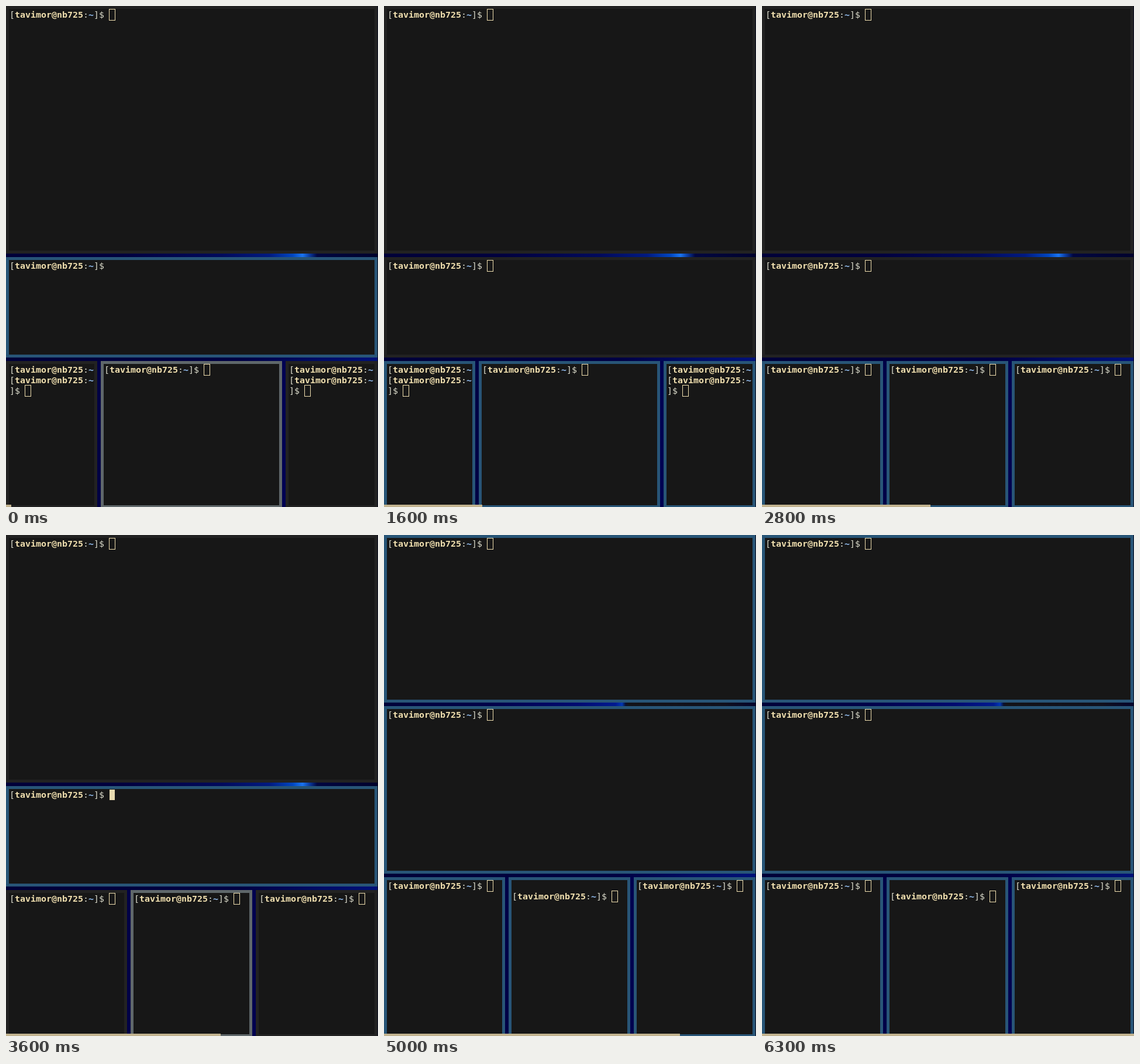
These frames come from a looping animation (636x858 px, 6400 ms). An HTML page:

```html
<!DOCTYPE html>
<html lang="en">
<head>
<meta charset="utf-8">
<title>Tiling windows</title>
<style>
  html, body { margin: 0; width: 100%; height: 100%; overflow: hidden; background: #00003c; }
  #stage { position: absolute; left: 0; top: 0; width: 636px; height: 858px; overflow: hidden;
    background: linear-gradient(90deg, #000038, #000046 30%, #000050 70%, #00065c); }
  .gap { position: absolute; left: 0; width: 636px; height: 6px; }
  #glow { background: linear-gradient(90deg, #000038 0, #00003e 200px, #000a5c 370px, #001a80 450px,
    #0046c0 490px, #1a74f0 507px, #0a3aa0 519px, #000640 532px, #00022c 636px); }
  #glow.high { background: linear-gradient(90deg, #000038 0, #000048 180px, #000a70 330px, #001a90 396px,
    #0038b4 407px, #0a1030 413px, #131318 418px, #10101c 580px, #04042c 636px); }
  #low { background: linear-gradient(90deg, #000038 0, #000042 400px, #000c66 540px, #001078 636px); }
  #edge { position: absolute; left: 635px; top: 0; width: 1px; height: 858px; background: #0c0f20; }
  .pane { position: absolute; box-sizing: border-box; overflow: hidden; background: #171717; border: 5px solid #222; }
  .pane.focus { border-color: #285577; }
  .pane.recent { border-color: #5f676a; }
  .line { position: absolute; left: 1px; height: 18px; white-space: pre; color: #dcdccc;
    font: 14.95px/18px "DejaVu Sans Mono", monospace; }
  .line b { color: #f0dfaf; }
  .line .dir { color: #94bff3; }
  .cursor { position: absolute; box-sizing: border-box; width: 11px; height: 20px; border: 1px solid #f0dfaf; }
  .cursor.solid { border-color: transparent; background: #e8dab0 padding-box; }
  .cursor.off { visibility: hidden; }
  #bar { position: absolute; left: 0; top: 854px; height: 4px; background: #c2b38f; }
</style>
</head>
<body>
<div id="stage">
  <div class="gap" id="glow"></div>
  <div class="gap" id="low"></div>
  <div id="edge"></div>
  <div id="bar"></div>
</div>
<script>
const LOOP = 6400, TICK = 100, WIDTH = 636, CELL = 9, ROW = 18;
const $ = id => document.getElementById(id);
const HEAD = '[<b>tavimor@nb725</b>:<b class="dir">~</b>';
const PROMPT = { lines: [HEAD + ']$ '], col: 19, row: 0 };
const WRAPPED = { lines: [HEAD, HEAD, ']$ '], col: 3, row: 2 };
const LOWERED = { lines: ['', HEAD + ']$ '], col: 19, row: 1 };

// split: end of first row, end of second row; columns: [x, width]
const uneven = [[0, 156], [162, 310], [478, 157]];
const even = [[0, 207], [213, 208], [427, 208]];
const initial = { split: [424, 602], cols: uneven, text: [PROMPT, PROMPT, WRAPPED, PROMPT, WRAPPED] };
const columns = { split: [424, 602], cols: even, text: Array(5).fill(PROMPT) };
const balanced = { split: [287, 580], cols: even, text: [PROMPT, PROMPT, PROMPT, LOWERED, PROMPT] };

const bottom = [2, 3, 4], all = [0, 1, 2, 3, 4];
const steps = [
  { at: -600, layout: initial, focus: [1], recent: 3 },
  { at: 800, layout: initial, focus: [3] },
  { at: 1500, layout: initial, focus: bottom },
  { at: 2400, layout: columns, focus: bottom },
  { at: 3000, layout: columns, focus: [3] },
  { at: 3500, layout: columns, focus: [1], recent: 3 },
  { at: 4200, layout: columns, focus: all },
  { at: 4900, layout: balanced, focus: all }
];

const panes = all.map(() => {
  const el = document.createElement('div');
  $('stage').insertBefore(el, $('bar'));
  return el;
});

function place(el, x, y, w, h) {
  Object.assign(el.style, { left: x + 'px', top: y + 'px', width: w + 'px', height: h + 'px' });
}

function fill(el, { lines, col, row }) {
  const rows = lines.map((s, i) => `<div class="line" style="top:${1 + i * ROW}px">${s}</div>`);
  el.innerHTML = rows.join('') +
    `<div class="cursor" style="left:${col * CELL}px;top:${row * ROW}px"></div>`;
}

function arrange({ split: [a, b], cols, text }) {
  place(panes[0], 0, 0, 635, a);
  place(panes[1], 0, a + 6, 635, b - a - 6);
  cols.forEach(([x, w], i) => place(panes[2 + i], x, b + 6, w, 860 - b - 6));
  panes.forEach((el, i) => fill(el, text[i]));
  $('glow').style.top = a + 'px';
  $('low').style.top = b + 'px';
  $('glow').classList.toggle('high', a < 400);
}

function paint(step, t) {
  const single = step.focus.length === 1;
  const lit = (t - step.at) % 1000 < 500;
  panes.forEach((el, i) => {
    const focused = step.focus.includes(i);
    el.className = 'pane' + (focused ? ' focus' : i === step.recent ? ' recent' : '');
    const active = focused && single;
    el.lastChild.className = 'cursor' + (active ? (lit ? ' solid' : ' off') : '');
  });
}

let layout;
const start = performance.now();

function frame() {
  const tick = Math.floor(((performance.now() - start) % LOOP) / TICK);
  const t = tick * TICK;
  const step = steps.filter(s => s.at <= t).pop();
  if (step.layout !== layout) arrange(layout = step.layout);
  paint(step, t);
  $('bar').style.width = Math.floor((tick + 1) * TICK / LOOP * WIDTH) + 'px';
  requestAnimationFrame(frame);
}
frame();
</script>
</body>
</html>
```
